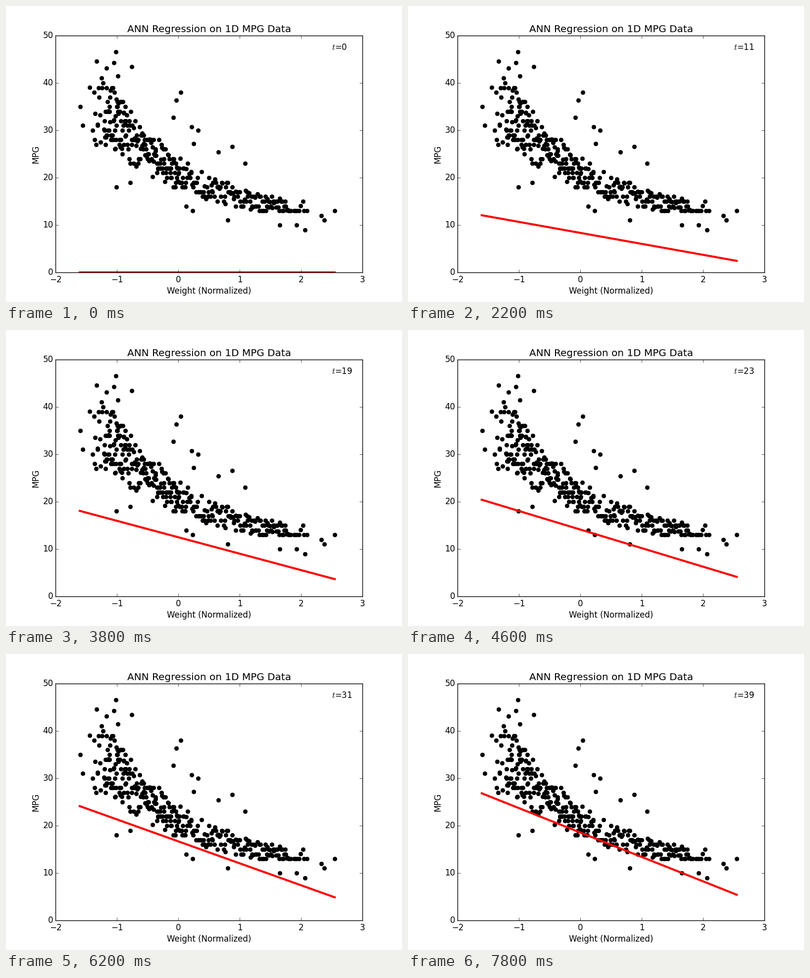
Recreate the animation shown at these times as a matplotlib script. Size 800 by 600 pixels, loop 8 s.

```python
import matplotlib.pyplot as plt
import numpy as np
from matplotlib.animation import FuncAnimation

FRAMES, INTERVAL = 40, 200
LINE_X = [-1.605, 2.549]
FINAL_Y = np.array([34.05, 6.88])
RATE = 0.961

# Cars that stand clear of the cloud: weight, mpg
STRAYS = [
    (-1.60, 35), (-1.56, 31), (-1.44, 39.1), (-1.33, 44.6), (-1.30, 39),
    (-1.17, 43.1), (-1.02, 46.6), (-1.05, 44.3), (-0.98, 41.5), (-0.76, 43.4),
    (-1.01, 18), (-0.78, 19), (-0.08, 32.7), (-0.03, 36.4), (0.04, 38),
    (0.22, 30.7), (0.32, 30), (0.25, 27.2), (0.65, 25.4), (0.88, 26.6),
    (1.09, 23), (0.13, 14), (0.23, 13), (0.81, 11), (1.65, 10),
    (1.93, 10), (2.065, 9), (2.33, 12), (2.38, 11), (2.549, 13),
]


def make_cloud(n=335):
    """Mileage falls off exponentially with weight, and so does its spread."""
    rng = np.random.default_rng(7)
    share = (np.arange(n) + rng.random(n)) / n
    weight = np.interp(share, [0, 0.04, 0.24, 0.6, 0.97, 1],
                       [-1.4, -1.21, -0.85, 0.1, 1.8, 2.1])
    excess = 10 * np.exp(-0.72 * np.maximum(weight, -1.15))
    spread = 0.8 + 0.28 * excess
    mpg = 11 + excess + spread * rng.uniform(-1, 1, n)
    # Most mileages are whole numbers
    mpg = np.where(rng.random(n) < 0.65, np.round(mpg), np.round(mpg, 1))
    return weight, np.maximum(mpg, 13)


def fit_at(step):
    """Both ends of the fitted line, closing in on the final fit."""
    return FINAL_Y * (1 - RATE ** step)


plt.style.use("classic")
plt.rcParams["axes.labelpad"] = 3.8
plt.rcParams["ytick.major.pad"] = 3.3

fig = plt.figure(figsize=(8, 6), dpi=100, facecolor="w")
ax = fig.add_subplot()
ax.plot(*make_cloud(), "ko")
ax.plot(*zip(*STRAYS), "ko")
line, = ax.plot(LINE_X, fit_at(0), "r", lw=3)
label = ax.text(2.5, 47, "$t$=0")
ax.set(xlim=(-2, 3), ylim=(0, 50))
ax.set_title("ANN Regression on 1D MPG Data", x=0.501)
ax.set_xlabel("Weight (Normalized)", x=0.501)
ax.set_ylabel("MPG")


def draw(step):
    line.set_ydata(fit_at(step))
    label.set_text(f"$t$={step}")
    return line, label


anim = FuncAnimation(fig, draw, frames=FRAMES, interval=INTERVAL, repeat=True,
                     repeat_delay=0)
plt.show()
```
